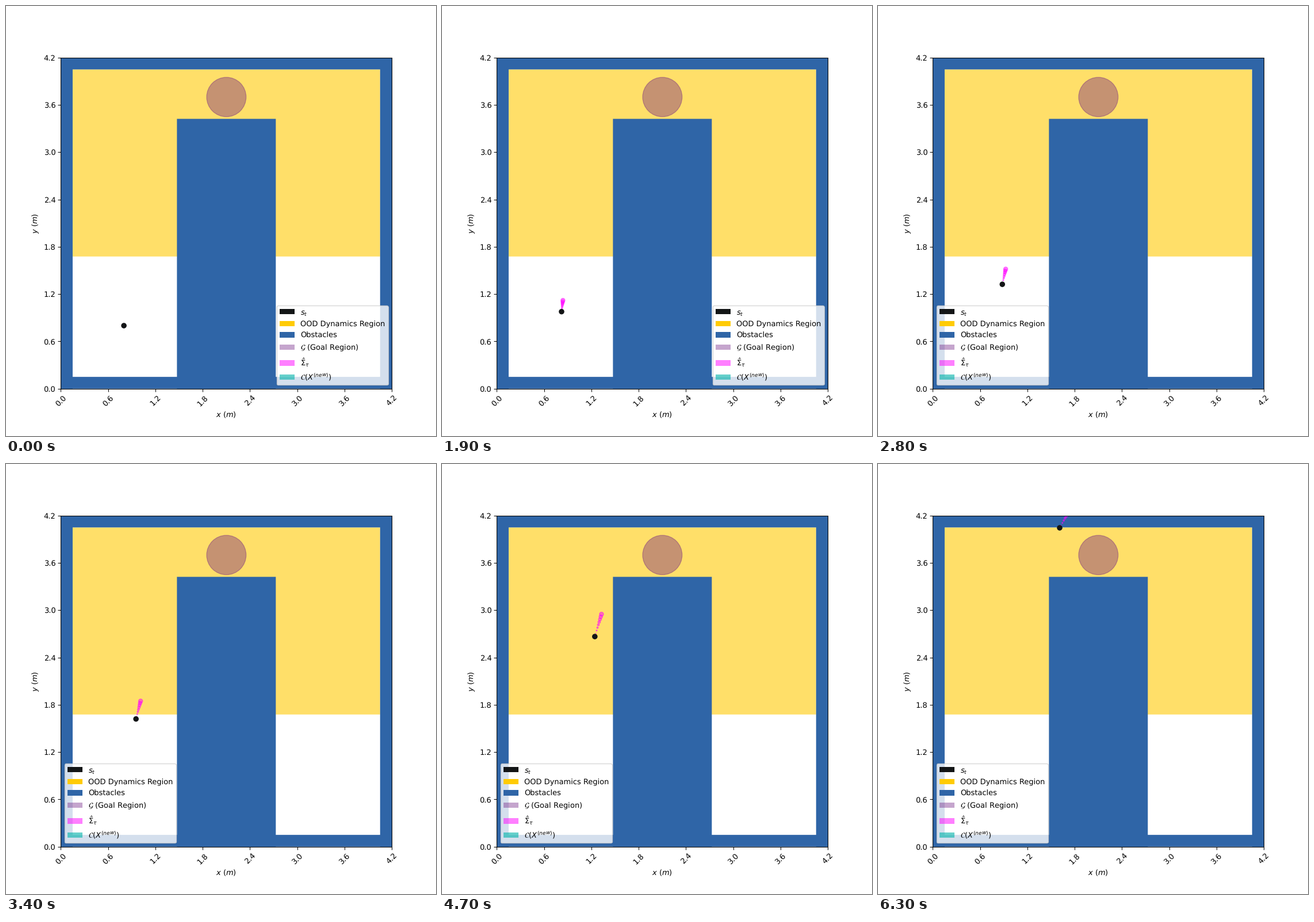
These frames come from a looping animation (748 by 748 pixels, 6350 ms). A matplotlib script:

```python
import numpy as np
import matplotlib.pyplot as plt
from matplotlib.animation import FuncAnimation
from matplotlib.patches import Circle, Patch, Rectangle

FRAMES, INTERVAL = 127, 50
SIZE, WALL = 4.2, 0.15
HORIZON, REACH, SOFT = 8, 0.365, 0.029
LEGEND_JUMP = 45

BLACK, MAIZE, BLUE = "#131516", "#ffcb05", "#2f65a7"
PURPLE, TEAL = "#702082", "#00b2a9"

# Waypoints in metres, evenly spaced in time; the last lies past the loop's end
SPAN = 18
WAY = np.array([(0.80, 0.80), (0.822, 0.812), (0.818, 0.95),
                (0.872, 1.28), (0.986, 1.745), (1.19, 2.485),
                (1.435, 3.317), (1.609, 4.045), (2.10, 4.50)])
SLOPE = np.gradient(WAY, axis=0)
SLOPE[0] = 0  # starts at rest


def path(t):
    """Smooth spline through the waypoints."""
    i = int(np.clip(t // SPAN, 0, len(WAY) - 2))
    u = t / SPAN - i
    ease = u * u * (3 - 2 * u)
    return (WAY[i] + ease * (WAY[i + 1] - WAY[i])
            + u * (1 - u) ** 2 * SLOPE[i] - u * u * (1 - u) * SLOPE[i + 1])


def forecast(t):
    """Offset to the last predicted state: along the velocity, saturating."""
    v = path(t + 0.5) - path(t - 0.5)
    speed = np.hypot(*v) + 1e-9
    return v / speed * REACH * (1 - np.exp(-speed / SOFT))


plt.rcParams["text.hinting"] = "none"
fig, ax = plt.subplots(figsize=(8, 8), dpi=93.5)


def box(x0, y0, x1, y1, color, alpha=None):
    ax.add_patch(Rectangle((x0, y0), x1 - x0, y1 - y0, facecolor=color,
                           alpha=alpha, linewidth=0, snap=False))


def disc(xy, r, color, alpha=None, z=1):
    return ax.add_patch(Circle(xy, r, color=color, alpha=alpha, zorder=z))


inner = SIZE - WALL
box(WALL, 1.677, inner, inner, MAIZE, 0.6)
box(0, 0, WALL, SIZE, BLUE)
box(inner, 0, SIZE, SIZE, BLUE)
box(0, 0, SIZE, WALL, BLUE)
box(0, inner, SIZE, SIZE, BLUE)
box(1.473, 0, 2.727, 3.423, BLUE)
disc((2.1, 3.7), 0.25, PURPLE, 0.4)

steps = np.arange(1, HORIZON + 1) / HORIZON
tube = [disc(WAY[0], 0.026 * u, "magenta", 0.5, 1.5) for u in steps]
robot = disc(WAY[0], 0.03, BLACK, z=2)

ticks = np.arange(8) * 0.6
ax.set(xlim=(0, SIZE), ylim=(0, SIZE), aspect="equal",
       xlabel=r"$x\ (m)$", ylabel=r"$y\ (m)$", xticks=ticks, yticks=ticks)
ax.tick_params(axis="x", rotation=45)

entries = [
    (r"$s_t$", BLACK, 1),
    ("OOD Dynamics Region", MAIZE, 1),
    ("Obstacles", BLUE, 1),
    (r"$\mathcal{G}$ (Goal Region)", PURPLE, 0.4),
    (r"$\hat{\Sigma}_\tau$", "magenta", 0.5),
    (r"$\mathcal{C}(X^{(new)})$", TEAL, 0.6),
]
handles = [Patch(facecolor=c, alpha=a, linewidth=0, label=text)
           for text, c, a in entries]
right, left = (ax.legend(handles=handles, loc=f"lower {side}",
                         labelspacing=0.52) for side in ("right", "left"))
ax.add_artist(right)


def update(k):
    pos, ahead = path(k), forecast(k)
    robot.center = pos
    for u, c in zip(steps, tube):
        c.center = pos + u * (1.1 - 0.1 * u) * ahead
    right.set_visible(k < LEGEND_JUMP)
    left.set_visible(k >= LEGEND_JUMP)
    return [*tube, robot, right, left]


anim = FuncAnimation(fig, update, frames=FRAMES, interval=INTERVAL,
                     repeat=True, repeat_delay=0)
plt.show()
```
